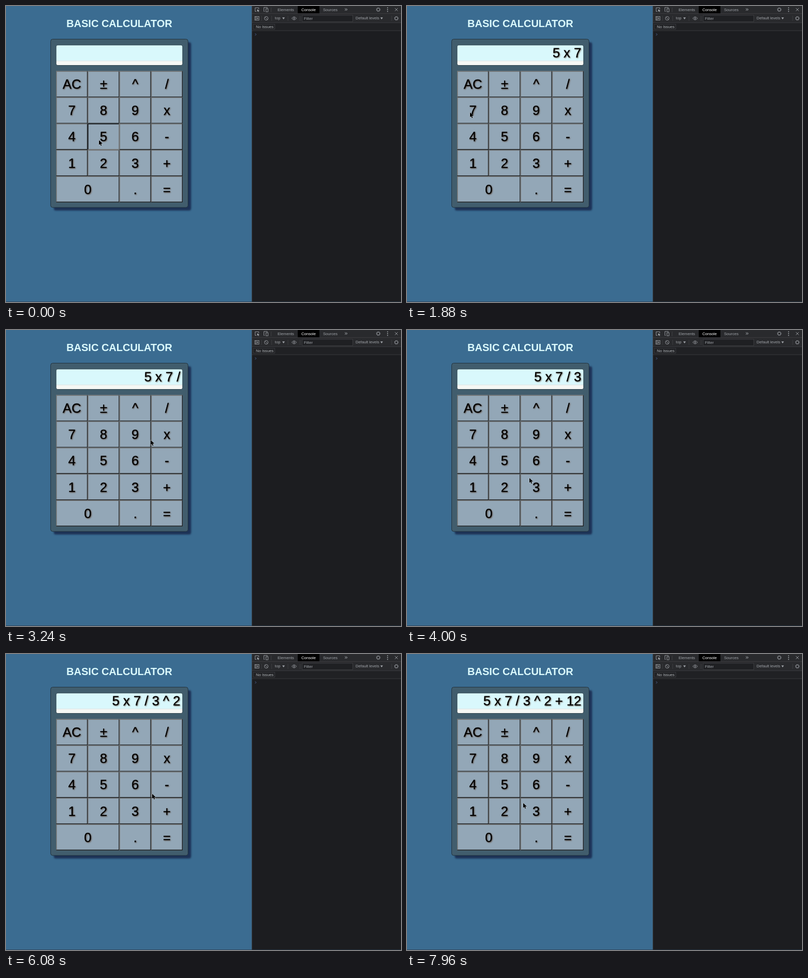
These frames come from a looping animation (765 by 576 pixels, 8 s). An HTML page:

```html
<!DOCTYPE html>
<html lang="en">
<head>
<meta charset="utf-8">
<title>Basic Calculator</title>
<style>
  html, body { margin: 0; width: 100%; height: 100%; overflow: hidden; background: #3b6c91; }
  svg { display: block; width: 100vw; height: 100vh; font-family: "Liberation Sans", Arial, sans-serif; }
  .big { font-size: 25.7px; stroke: #000; stroke-width: .3; }
  .raised { filter: drop-shadow(1.6px 1.6px 1px rgba(75, 48, 30, .75)); }
  .key rect { fill: #93a7b7; }
  .key path { fill: none; stroke-width: 1.4; }
  .key .lit, .key.down .dim { stroke: #70706f; }
  .key .dim, .key.down .lit { stroke: #171819; }
  .tools { font-size: 7.65px; fill: #a0a4a9; }
  .icon { fill: none; stroke: #9a9ea3; stroke-width: .9; }
  .rule { fill: none; stroke: #45474a; stroke-width: .7; }
</style>
</head>
<body>
<svg viewBox="0 0 765 576" preserveAspectRatio="none">
  <defs>
    <filter id="soft" x="-10%" y="-10%" width="120%" height="120%"><feGaussianBlur stdDeviation="1.5"/></filter>
    <clipPath id="glass"><rect x="97" y="76" width="245" height="39.5" rx="3"/></clipPath>
    <g id="gear">
      <circle r="2.8" class="icon" stroke-width="1.3"/>
      <circle r="3.8" class="icon" stroke-dasharray="1.5 1.485"/>
    </g>
  </defs>

  <rect width="765" height="576" fill="#3b6c91"/>
  <text x="219.5" y="41" text-anchor="middle" font-size="20" font-weight="bold" fill="#dbfafd">BASIC CALCULATOR</text>

  <rect x="92.5" y="70.5" width="266" height="327.5" rx="4" fill="#1d3156" filter="url(#soft)"/>
  <rect x="86.5" y="64.5" width="266" height="327.5" rx="4" fill="#415d6d" stroke="#22333f"/>
  <g clip-path="url(#glass)">
    <rect x="97" y="76" width="245" height="40" fill="#f5f7f4"/>
    <rect x="97" y="76" width="245" height="30.7" fill="#d9f8fc"/>
    <path d="M97 107H342" stroke="#d3dcdc" stroke-width=".7"/>
  </g>
  <rect x="97" y="76" width="245" height="39.5" rx="3" fill="none" stroke="#263a45" stroke-width=".9"/>
  <g id="keys"></g>
  <g id="labels" class="big raised" text-anchor="middle"></g>
  <g class="big raised"><text id="readout" x="337.6" y="100" text-anchor="end"></text></g>

  <rect x="476" width="289" height="576" fill="#1c1d20"/>
  <rect x="476" width="289" height="32.5" fill="#292a2d"/>
  <rect x="476" y="32.5" width="289" height="15.5" fill="#202124"/>
  <rect x="565" width="42" height="14.5" fill="#000"/>
  <path class="rule" d="M476.3 0V576M476 14.7H765M476 32.6H765M476 48H765M513.5 3V12M494.8 19V29M514.5 19V29M546 19V29M569.5 19V29M747 19V29"/>
  <rect class="rule" x="573.7" y="18" width="98" height="12.4" style="fill:#1f2023"/>
  <rect class="rule" x="479" y="35.3" width="41.5" height="9.8"/>
  <g class="tools">
    <text x="526" y="9.6">Elements</text>
    <text x="572" y="9.6" fill="#fff">Console</text>
    <text x="614" y="9.6">Sources</text>
    <text x="655.5" y="9.8" font-size="11">»</text>
    <text x="520.8" y="26.4">top</text>
    <text x="577" y="27">Filter</text>
    <text x="677" y="26.4">Default levels</text>
    <text x="484" y="43" fill="#b4b8bc">No Issues</text>
    <path d="M535 22.3h5l-2.5 3.6zM725 22.3h5l-2.5 3.6z"/>
    <circle cx="739" cy="3.6" r="1"/><circle cx="739" cy="7" r="1"/><circle cx="739" cy="10.4" r="1"/>
    <path d="M486 6.5l5 2-2.2.8 1.5 1.7-.8.8-1.6-1.7-.8 1.6z"/>
  </g>
  <g class="icon">
    <path d="M485 10.5H482.5V3.5H489.5V6"/>
    <path d="M501 10.5H499.5V2.8H506V4.5"/><rect x="503.5" y="5.2" width="4" height="6"/>
    <path d="M753.2 4.2l5.6 5.6M758.8 4.2l-5.6 5.6"/>
    <rect x="482" y="20.5" width="8" height="7"/><path d="M484 20.5v7M486.3 22.3l2.2 1.7-2.2 1.7z"/>
    <circle cx="504" cy="24" r="3.6"/><path d="M501.5 21.5l5 5"/>
    <path d="M553.5 24q4.5-6 9 0q-4.5 6-9 0z"/><circle cx="558" cy="24" r="1.2"/>
  </g>
  <use href="#gear" x="721" y="7"/>
  <use href="#gear" x="756" y="24"/>
  <path d="M482 53.4l3 2-3 2" fill="none" stroke="#45597f" stroke-width=".9"/>
  <path d="M0 575.6H765" stroke="#26394a" stroke-width=".8"/>

  <path id="pointer" d="M0 0V9.5L2.2 7.6 3.7 11 5.4 10.3 3.9 7 7 6.8Z" stroke="#e8eef2" stroke-width=".8" paint-order="stroke"/>
</svg>
<script>
const LOOP = 8000, STEP = 40;
const $ = id => document.getElementById(id);
const make = (tag, attrs, parent) => {
  const el = document.createElementNS('http://www.w3.org/2000/svg', tag);
  for (const name in attrs) el.setAttribute(name, attrs[name]);
  return parent.appendChild(el);
};

const keys = {};
function addKey(label, col, row, span = 1) {
  const x = 97 + col * 61.3, y = 126.5 + row * 51.15;
  const w = 61.3 * span, h = 51.15, i = .7;
  const g = make('g', { class: 'key' }, $('keys'));
  make('rect', { x, y, width: w, height: h }, g);
  make('path', { class: 'dim', d: `M${x} ${y + h - i}H${x + w - i}V${y}` }, g);
  make('path', { class: 'lit', d: `M${x + i} ${y + h - 1}V${y + i}H${x + w - 1}` }, g);
  make('text', { x: x + w / 2, y: y + 34.6 }, $('labels')).textContent = label;
  keys[label] = g;
}
['AC ± ^ /', '7 8 9 x', '4 5 6 -', '1 2 3 +'].forEach((line, row) =>
  line.split(' ').forEach((label, col) => addKey(label, col, row)));
addKey('0', 0, 4, 2);
addKey('.', 2, 4);
addKey('=', 3, 4);

// key, press time, release time, text shown after release
const presses = [
  ['5', 0, 80, '5'],
  ['x', 640, 760, '5 x'],
  ['7', 1400, 1520, '5 x 7'],
  ['/', 2840, 2960, '5 x 7 / '],
  ['3', 3560, 3680, '5 x 7 / 3'],
  ['^', 4440, 4560, '5 x 7 / 3 ^'],
  ['2', 5440, 5560, '5 x 7 / 3 ^ 2'],
  ['+', 6440, 6560, '5 x 7 / 3 ^ 2 +'],
  ['1', 7240, 7400, '5 x 7 / 3 ^ 2 + 1'],
  ['2', 7680, 7800, '5 x 7 / 3 ^ 2 + 12']
].map(p => [p[0], p[1], p[2], p[3].trim()]);

// time, x, y; a repeated place is a rest
const path = [
  [0, 180, 261], [160, 180, 261], [560, 303, 209], [800, 303, 209],
  [1040, 198, 209], [1300, 122, 207], [2160, 122, 207],
  [2560, 281, 157], [2740, 305, 154], [3060, 305, 154],
  [3480, 242, 307], [3800, 242, 307], [4000, 237, 288],
  [4320, 246, 154], [4680, 246, 154], [5120, 184, 300], [5880, 184, 300],
  [6080, 283, 272], [6320, 305, 306], [6680, 305, 306],
  [7160, 124, 306], [7420, 124, 306], [7620, 184, 305], [7820, 184, 305],
  [7960, 225, 290], [8000, 233, 284]
];

function slope(i, k) {
  const a = path[i - 1], b = path[i], c = path[i + 1];
  if (!a || !c) return 0;
  const same = (p, q) => p[1] === q[1] && p[2] === q[2];
  return same(a, b) || same(b, c) ? 0 : (c[k] - a[k]) / (c[0] - a[0]);
}

function place(t, k) {
  let i = 0;
  while (i < path.length - 2 && t >= path[i + 1][0]) i++;
  const a = path[i], b = path[i + 1], d = b[0] - a[0], u = (t - a[0]) / d, v = 1 - u;
  return a[k] * v * v * (1 + 2 * u) + b[k] * u * u * (3 - 2 * u)
    + d * u * v * (slope(i, k) * v - slope(i + 1, k) * u);
}

function draw(now) {
  const t = Math.floor(now % LOOP / STEP) * STEP;
  const held = presses.find(p => t >= p[1] && t < p[2]);
  const typed = presses.filter(p => t >= p[2]).pop();
  for (const label in keys) keys[label].classList.toggle('down', !!held && held[0] === label);
  $('readout').textContent = typed ? typed[3] : '';
  $('pointer').setAttribute('transform', `translate(${place(t, 1)} ${place(t, 2)})`);
  requestAnimationFrame(() => draw(performance.now() - start));
}
const start = performance.now();
draw(0);
</script>
</body>
</html>
```
